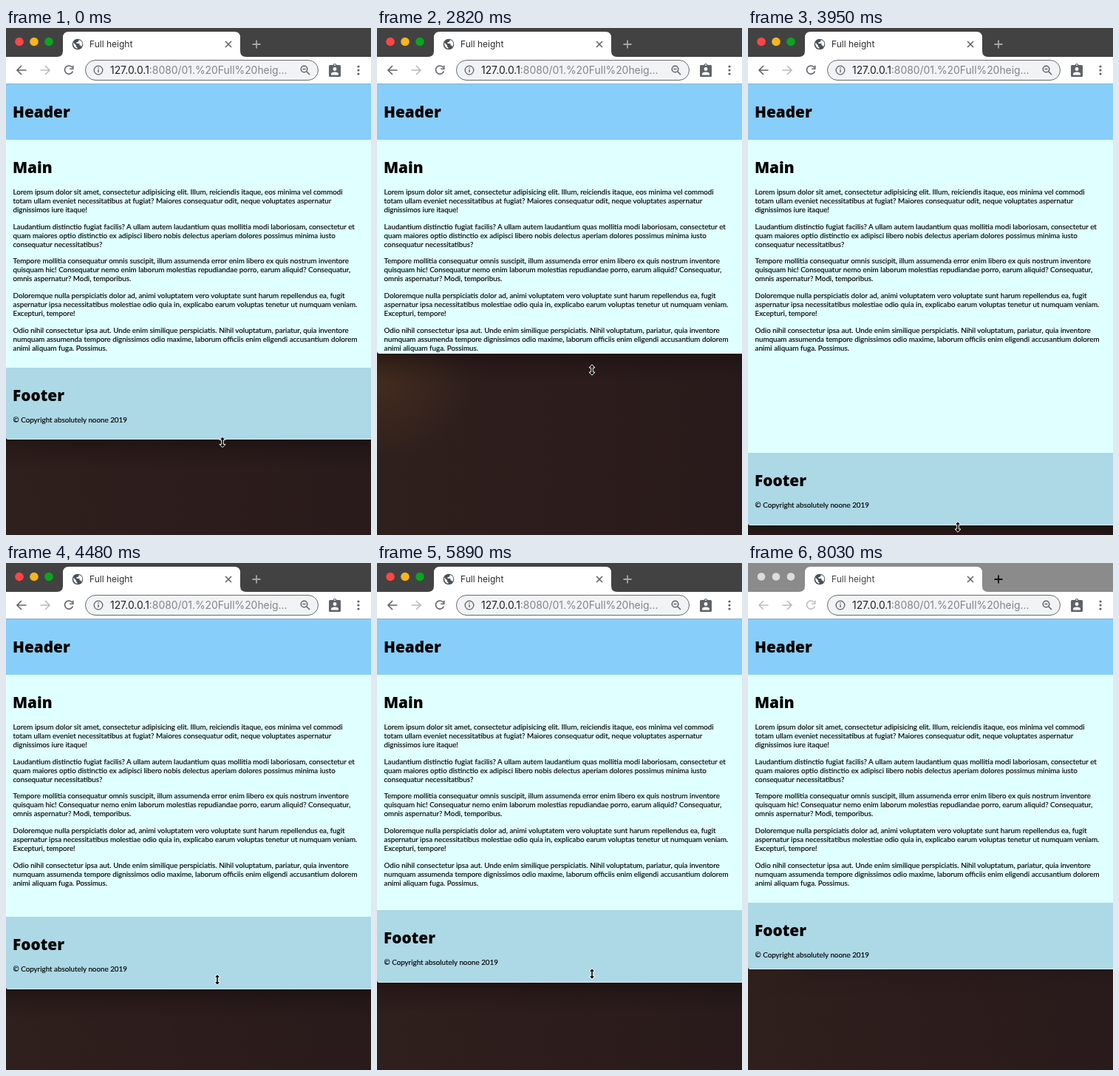
An HTML page that plays this animation: 494 by 685 pixels, repeating every 8.13 s.

```html
<!DOCTYPE html>
<html lang="en">
<head>
<meta charset="utf-8">
<title>Full height</title>
<style>
  html, body { margin: 0; width: 100%; height: 100%; overflow: hidden; background: #2b1d1c; }
  svg { display: block; width: 494px; height: 685px; }
  .ui { font-family: Inter, sans-serif; }
  .copy { font: 9.82px Lato, sans-serif; stroke: #000; stroke-width: .15px; }
  .head { font: 800 20.8px "Open Sans", sans-serif; }
  .line { fill: none; stroke: #5f6368; stroke-width: 1.6; }
  #bar { fill: #424243; }
  #lights circle { stroke-width: .6; }
  #plus { stroke: #a6a6a6; }
  #forward { stroke: #b9bbbd; }
  .idle #bar { fill: #8b8b8b; }
  .idle #lights circle { fill: #dcdcdc; stroke: #6f6f6f; }
  .idle #plus { stroke: #111; }
  .idle .nav { stroke: #bcbec0; }
  .idle #title { fill: #444; }
  .idle #shadow { opacity: .35; }
</style>
</head>
<body>
<svg id="stage" viewBox="0 0 494 685" xmlns="http://www.w3.org/2000/svg">
  <defs>
    <linearGradient id="desk">
      <stop offset="0" stop-color="#2f1f1d"/>
      <stop offset="1" stop-color="#291b1b"/>
    </linearGradient>
    <radialGradient id="glow" gradientUnits="userSpaceOnUse" cx="0" cy="0" r="1"
      gradientTransform="translate(0 474) scale(130 110)">
      <stop offset="0" stop-color="#442c1e"/>
      <stop offset="1" stop-color="#442c1e" stop-opacity="0"/>
    </radialGradient>
    <linearGradient id="fade" x2="0" y2="1">
      <stop offset="0" stop-color="#0e0808" stop-opacity=".45"/>
      <stop offset=".4" stop-color="#0e0808" stop-opacity=".2"/>
      <stop offset="1" stop-color="#0e0808" stop-opacity="0"/>
    </linearGradient>
    <clipPath id="frame"><rect id="clip" x="0" y="-20" width="520" height="576" rx="4"/></clipPath>
  </defs>

  <rect width="494" height="685" fill="url(#desk)"/>
  <rect y="360" width="140" height="230" fill="url(#glow)"/>
  <rect id="shadow" width="494" height="42" fill="url(#fade)"/>

  <g clip-path="url(#frame)">
    <rect y="151" width="494" height="534" fill="#e0ffff"/>
    <rect y="76" width="494" height="75" fill="#87cefa"/>
    <text class="head" x="9" y="121">Header</text>
    <text class="head" x="9" y="196">Main</text>
    <g id="paras" class="copy"></g>
    <g id="footer">
      <rect width="494" height="240" fill="#add8e6"/>
      <text class="head" x="9" y="45">Footer</text>
      <text class="copy" x="9.5" y="74">© Copyright absolutely noone 2019</text>
    </g>
    <rect id="edge" width="494" height="1" fill="#fff" opacity=".55"/>

    <rect id="bar" width="494" height="40"/>
    <g id="lights">
      <circle cx="18" cy="18.5" r="5.8" fill="#ff4644"/>
      <circle cx="38" cy="18.5" r="5.8" fill="#f8b51c"/>
      <circle cx="58" cy="18.5" r="5.8" fill="#0aa61e"/>
    </g>
    <path fill="#fff" d="M69 39Q77 39 77 31V13Q77 5 85 5H309Q317 5 317 13V31Q317 39 325 39H494V75H0V39Z"/>
    <rect y="75" width="494" height="1" fill="#8fb0cc"/>

    <circle cx="97" cy="22" r="7.3" fill="#4a5156"/>
    <path fill="#fff" d="M91 19.5L95 23.5V25L96.5 26.5V28Q91 27 91 19.5ZM98.5 16V17.5L97 19H95.5V21H99.5V23.5H101L102 25.5Q105 21 101.5 17.2Z"/>
    <text id="title" class="ui" x="113" y="26.3" font-size="12" fill="#2b2d30">Full height</text>
    <path class="line" d="M297 18l8 8m0-8l-8 8"/>
    <path id="plus" fill="none" stroke-width="1.8" d="M333.5 22h11M339 16.5v11"/>

    <path class="line nav" d="M27.5 57H15.5M21 51l-6 6 6 6"/>
    <path id="forward" class="nav" fill="none" stroke-width="1.6" d="M46.5 57h12M53 51l6 6-6 6"/>
    <path class="line nav" d="M89.6 53.2A5.6 5.6 0 1 0 90.4 58.4M90.7 50.8V55.2H86.2"/>

    <rect x="107.5" y="43.5" width="315" height="27" rx="13.5" fill="#f1f3f4" stroke="#666b70"/>
    <circle class="line" cx="125" cy="57" r="5.8" style="stroke-width:1.3"/>
    <path class="line" d="M125 56v4M125 53.2v1.6" style="stroke-width:1.4"/>
    <text class="ui" x="141" y="62" font-size="13.9" fill="#80868b"><tspan fill="#202124">127.0.0.1</tspan>:8080/01.%20Full%20heig...</text>
    <circle class="line" cx="403.5" cy="55.5" r="4.3" style="stroke-width:1.5"/>
    <path class="line" d="M406.7 58.7l4.3 4.3M401.5 55.5h4" style="stroke-width:1.5"/>

    <path fill="#5f6368" d="M438.5 50H442.5A2.6 2.6 0 0 1 447.5 50H451.5Q453 50 453 51.5V64.5Q453 66 451.5 66H438.5Q437 66 437 64.5V51.5Q437 50 438.5 50Z"/>
    <circle cx="445" cy="50" r=".9" fill="#fff"/>
    <circle cx="445" cy="55.5" r="2.4" fill="#fff"/>
    <path fill="#fff" d="M440 63.5V62.3Q440 59.5 445 59.5T450 62.3V63.5Z"/>
    <g fill="#5f6368">
      <circle cx="477" cy="52" r="1.6"/>
      <circle cx="477" cy="57" r="1.6"/>
      <circle cx="477" cy="62" r="1.6"/>
    </g>
  </g>

  <path id="cursor" stroke="#fff" stroke-width="1" stroke-linejoin="round"/>
</svg>
<script>
const $ = id => document.getElementById(id);
const LOOP = 8130;
const RESIZE = 'M0-7.2L4-3H1.3V3H4L0 7.2-4 3H-1.3V-3H-4Z';
const ARROW = 'M0 0V15.5L3.6 12.2 6 17 8.3 16 6.2 11.3H10.8Z';

const paras = [
  ['Lorem ipsum dolor sit amet, consectetur adipisicing elit. Illum, reiciendis itaque, eos minima vel commodi',
   'totam ullam eveniet necessitatibus at fugiat? Maiores consequatur odit, neque voluptates aspernatur',
   'dignissimos iure itaque!'],
  ['Laudantium distinctio fugiat facilis? A ullam autem laudantium quas mollitia modi laboriosam, consectetur et',
   'quam maiores optio distinctio ex adipisci libero nobis delectus aperiam dolores possimus minima iusto',
   'consequatur necessitatibus?'],
  ['Tempore mollitia consequatur omnis suscipit, illum assumenda error enim libero ex quis nostrum inventore',
   'quisquam hic! Consequatur nemo enim laborum molestias repudiandae porro, earum aliquid? Consequatur,',
   'omnis aspernatur? Modi, temporibus.'],
  ['Doloremque nulla perspiciatis dolor ad, animi voluptatem vero voluptate sunt harum repellendus ea, fugit',
   'aspernatur ipsa necessitatibus molestiae odio quia in, explicabo earum voluptas tenetur ut numquam veniam.',
   'Excepturi, tempore!'],
  ['Odio nihil consectetur ipsa aut. Unde enim similique perspiciatis. Nihil voluptatum, pariatur, quia inventore',
   'numquam assumenda tempore dignissimos odio maxime, laborum officiis enim eligendi accusantium dolorem',
   'animi aliquam fuga. Possimus.']
];
paras.forEach((lines, p) => lines.forEach((line, i) => {
  const text = document.createElementNS('http://www.w3.org/2000/svg', 'text');
  text.setAttribute('x', 9.5);
  text.setAttribute('y', Math.round(225 + p * 46.7) + i * 12);
  text.textContent = line;
  $('paras').append(text);
}));

// start, end, final cursor x, grab offset, cursor y per step
const drags = [
  [1250, 2040, 293, 3.5, [558, 556, 553, 549, 544, 537, 527, 500, 469, 452]],
  [2120, 2380, 293, 3.5, [434, 420, 416, 416]],
  [2650, 3430, 284, 1, [422, 436, 462, 492, 524, 553, 581, 607.5, 630, 642]],
  [3510, 4040, 284, 1, [652, 660, 666, 670, 673, 674, 674]],
  [4220, 4830, 288, 1, [656, 619, 580.5, 563, 549, 538, 532, 532]],
  [5010, 5810, 291, 1, [538, 550, 568, 588, 606, 618, 621, 608, 587, 571]],
  [5890, 6070, 292, 1, [555, 546, 542]],
  [6340, 6780, 294, 1, [543, 545, 547, 549, 550, 550]]
];
const exit = { start: 7230, end: 7670, steps: 5 };

const stepAt = (t, start, end, last) =>
  Math.min(last, Math.floor((t - start) / (end - start) * last + .1));

// The window edge trails the cursor by most of one step.
function pose(t) {
  let x = 293, y = 559.5, before = y, grab = 3.5;
  for (const [start, end, endX, offset, ys] of drags) {
    if (t < start) break;
    const last = ys.length - 1, k = stepAt(t, start, end, last);
    before = k ? ys[k - 1] : y;
    y = ys[k];
    x += (endX - x) * k / last;
    grab = offset;
  }
  return { x, y, bottom: Math.round(.8 * before + .2 * y - grab) };
}

function draw(t) {
  let { x, y, bottom } = pose(t);
  const leaving = t >= exit.start;
  let k = 0;
  if (leaving) {
    k = stepAt(t, exit.start, exit.end, exit.steps);
    const p = (k + 1) / exit.steps;
    x += 131 * p;
    y += 115 * p;
  }
  $('stage').classList.toggle('idle', t >= 8030);
  $('clip').setAttribute('height', bottom + 20);
  $('shadow').setAttribute('y', bottom - 1);
  $('edge').setAttribute('y', bottom - 1);
  $('footer').setAttribute('transform', `translate(0 ${Math.max(459, bottom - 98)})`);
  $('cursor').setAttribute('d', leaving ? ARROW : RESIZE);
  $('cursor').setAttribute('transform', `translate(${Math.round(x)} ${y})`);
  $('cursor').setAttribute('visibility', k === exit.steps ? 'hidden' : 'visible');
}

const began = performance.now();
function tick() {
  draw((performance.now() - began) % LOOP);
  requestAnimationFrame(tick);
}
tick();
</script>
</body>
</html>
```
